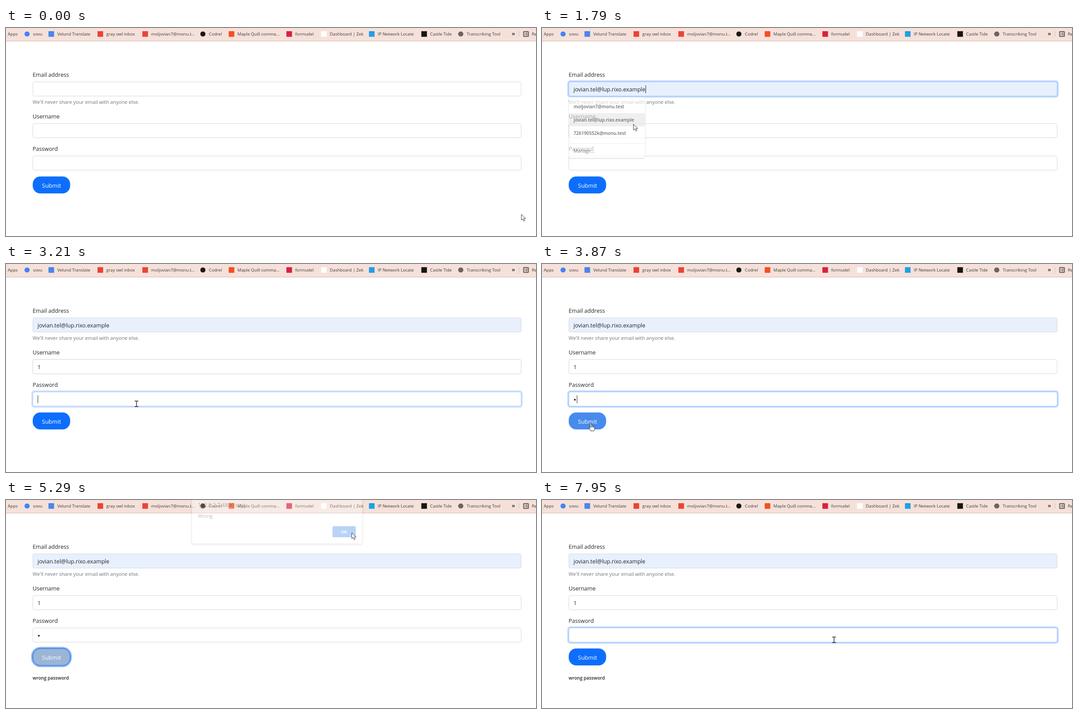
These frames come from a looping animation (1194x469 px, 8000 ms). An HTML page:

```html
<!DOCTYPE html>
<html lang="en">
<head>
<meta charset="utf-8">
<title>Sign-in form</title>
<style>
  html, body { margin: 0; width: 100%; height: 100%; overflow: hidden; background: #fff; }
  svg { display: block; width: 100vw; height: 100vh; }
  text { font-family: "Open Sans", sans-serif; font-size: 12.6px; fill: #212529; white-space: pre; }
  .mark { font-size: 9.6px; fill: #3b3a3a; }
  .hint { font-size: 11.2px; fill: #6c757d; }
  .row { font-size: 10.2px; font-weight: 600; fill: #202124; }
  .manage { font-size: 10.4px; fill: #3c4043; }
  .panel { fill: #fff; filter: drop-shadow(0 1px 1.5px rgba(0, 0, 0, .3)); }
  .dialog { fill: #fff; filter: drop-shadow(0 1px 2.5px rgba(0, 0, 0, .5)); }
</style>
</head>
<body>
<svg viewBox="0 0 1194 469" preserveAspectRatio="none">
  <g id="bar">
    <rect width="1194" height="29" fill="#f5e1da"/>
    <rect y="29" width="1194" height="1" fill="#d3b5ac"/>
    <text class="mark" x="4" y="17.3">Apps</text>
    <text class="mark" x="1139.5" y="17" style="font-size:12px;font-weight:700">»</text>
    <rect x="1155" y="7" width="1" height="13" fill="#d9bcb2"/>
    <g fill="none" stroke="#333" stroke-width="1.4">
      <rect x="1166" y="8" width="11" height="11" rx="1"/>
      <path d="M1168 11h1.4m1 0h5M1168 13.5h1.4m1 0h5M1168 16h1.4m1 0h5" stroke-width="1.1"/>
    </g>
    <text class="mark" x="1184.5" y="17.3">Reading list</text>
  </g>
  <text x="60" y="109.7">Email address</text>
  <text class="hint" x="60" y="170.6">We'll never share your email with anyone else.</text>
  <text x="60" y="203.7">Username</text>
  <text x="60" y="276.7">Password</text>
  <g id="fields"></g>
  <circle id="dot" cx="74" cy="306" r="2" fill="#212529"/>
  <rect id="caret" width="1" height="18" fill="#222"/>
  <rect id="button" x="60.2" y="334.8" width="84.3" height="38.2" rx="17"/>
  <g id="halo" fill="none">
    <rect x="58.4" y="333" width="88" height="42" rx="19" stroke="#0d6efd" stroke-opacity=".5" stroke-width="3.4"/>
    <rect x="60.4" y="334.9" width="84.2" height="38.2" rx="17" stroke="#0a58ca"/>
  </g>
  <text x="81" y="359.6" style="font-size:13px;fill:#fff">Submit</text>
  <text id="note" x="60" y="404.6" style="font-size:10.3px;font-weight:600">wrong password</text>
  <g id="popups"></g>
  <g id="alert">
    <rect class="dialog" x="420.5" y="-12" width="380.5" height="121.5" rx="4"/>
    <text x="434" y="27" style="font-size:11.8px;fill:#202124">192.0.2.7:4800 says</text>
    <text x="434" y="51" style="font-size:10.6px;fill:#202124">Wrong</text>
    <rect id="okRing" x="733" y="68.5" width="55" height="28" rx="4" fill="#fff" stroke="#1a73e8" stroke-width="1.6"/>
    <rect x="734.6" y="70" width="52" height="25" rx="2.5" fill="#1a73e8"/>
    <text x="760.3" y="86" text-anchor="middle" style="font-size:9.6px;font-weight:700;fill:#fff">OK</text>
  </g>
  <g id="cursor" stroke-linejoin="round" stroke-linecap="round">
    <path id="arrow" d="M0 .3V13.2L3.1 10.4 5.4 15.5 7.6 14.5 5.4 9.6H9.4Z" fill="#fff" stroke="#2b2b38" stroke-width=".95"/>
    <path id="beam" d="M-3.6-6H-1Q0-6 0-5Q0-6 1-6H3.6M0-5V5.5M-3.6 6.5H-1Q0 6.5 0 5.5Q0 6.5 1 6.5H3.6" fill="none" stroke="#222" stroke-width="1.4"/>
    <path id="hand" d="M-1.4.8Q0-1.3 1.4.8V6Q3-.2 4.2 6.2 5.4 4.9 6.4 6.7 8.6 6 8.6 8.4V11.8Q8.4 13.8 7.3 14.8V16.3H-.2V15Q-2.6 12.3-4.5 8.9-4.3 7-2.6 8.1L-1.4 9.5ZM1.4 6V8.6M4.2 6.2V8.6M6.4 6.7V8.8" fill="#fff" stroke="#2b2b33"/>
  </g>
</svg>
<script>
const $ = id => document.getElementById(id);

function add(parent, tag, attrs, text) {
  const node = document.createElementNS('http://www.w3.org/2000/svg', tag);
  set(node, attrs);
  if (text) node.textContent = text;
  parent.append(node);
  return node;
}
function set(node, attrs) { for (const k in attrs) node.setAttribute(k, attrs[k]); }
const fade = (node, opacity) => set(node, { opacity: +opacity });

// Linear 0..1 between two times, and the same eased
const ramp = (t, a, b) => Math.min(1, Math.max(0, (t - a) / (b - a)));
const ease = p => p * p * (3 - 2 * p);
const mix = (a, b, p) => a.map((v, i) => v + (b[i] - v) * p);

function bookmark(x, fill, label, round) {
  const r = round ? 5.8 : 6.3;
  add($('bar'), 'rect', { x: x - r, y: 13.5 - r, width: 2 * r, height: 2 * r, rx: round ? r : 0, fill });
  add($('bar'), 'text', { class: 'mark', x: x + 13.6, y: 17.3 }, label);
}
bookmark(47.5, '#4285f4', 'sovu', true);
bookmark(102, '#4a86e8', 'Velund Translate');
bookmark(212.5, '#ea4335', 'gray owl inbox');
bookmark(313.5, '#ea4335', 'moljovian7@monu.t...');
bookmark(443.5, '#1b1817', 'Codrel', true);
bookmark(508, '#f25022', 'Maple Quill comma...');
bookmark(638, '#d8213d', 'formudel');
bookmark(716, '#fff', 'Dashboard | Zek');
bookmark(824, '#1fa0e6', 'IP Network Locate');
bookmark(942, '#151515', 'Castle Tide');
bookmark(1024.5, '#6b6463', 'Transcribing Tool', true);

function field(y) {
  const g = $('fields');
  const outline = (parent, grow, attrs) => add(parent, 'rect', {
    x: 60.5 - grow, y: y + .5 - grow, width: 1100 + 2 * grow, height: 32 + 2 * grow, rx: 3.4 + grow, ...attrs
  });
  const box = outline(g, 0, { stroke: '#ced4da', 'stroke-width': .9 });
  const ring = add(g, 'g', { fill: 'none' });
  outline(ring, 0, { stroke: '#94bffe' });
  outline(ring, 2, { stroke: '#0d6efd', 'stroke-opacity': .25, 'stroke-width': 3 });
  return { y, box, ring, text: add(g, 'text', { x: 71, y: y + 21.6 }) };
}
const fields = [121, 215, 288].map(field);

function popup(top, rows) {
  const g = add($('popups'), 'g', {}), first = top + 6, end = first + 30 * rows.length;
  add(g, 'rect', { class: 'panel', x: 61, y: top, width: 171, height: end - top + 41, rx: 3 });
  const hover = add(g, 'rect', { x: 61, width: 171, height: 30, fill: '#e8e8e8' });
  rows.forEach((s, i) => add(g, 'text', { class: 'row', x: 71.3, y: first + 18.7 + 30 * i }, s));
  add(g, 'rect', { x: 61, y: end + 8, width: 171, height: 1, fill: '#e4e4e4' });
  add(g, 'text', { class: 'manage', x: 71.3, y: end + 28.8 }, 'Manage...');
  // Returns the text of the row under the pointer
  return (alpha, x, y) => {
    const i = Math.floor((y - first) / 30);
    const row = alpha > 0 && x > 61 && x < 232 && rows[i] || '';
    fade(g, alpha);
    fade(hover, row !== '');
    if (row) set(hover, { y: first + 30 * i });
    return row;
  };
}
const login = 'jovian.tel@lup.rixo.example';
const emailPopup = popup(156, ['moljovian7@monu.test', login, '726190552k@monu.test']);
const userPopup = popup(250, ['1', 'jovian', 'moljovian7', 'jovian.tel', '726190552k']);

// Times of what the user does
const T = {
  email: 680, pick: 1650, user: 2290, typeUser: 2590, pass: 3060, typePass: 3420,
  hover: 3640, submit: 3880, alert: 3980, ok: 5180, retry: 7130, erase: 7430
};

// Pointer moves: start, end, target x and y
const moves = [
  [70, 820, 238, 142], [890, 1400, 205, 231], [1440, 1510, 206, 217],
  [1930, 2250, 250, 236], [2740, 3050, 294, 315], [3360, 3740, 110, 360],
  [3980, 4133, 140, 399], [4400, 4533, 685, 196], [4533, T.ok, 779, 74],
  [5780, 6190, 767, 125], [6350, 6610, 684, 238], [6690, 6820, 647, 340], [7010, 7400, 658, 315]
];
const pointer = t => moves.reduce(
  (p, [a, b, x, y]) => mix(p, [x, y], ease(ramp(t, a, b))), [1161, 420]);

function pointerKind(t, x, y, overPopup) {
  if (t >= T.alert && t < T.ok) return y < 110 ? 'arrow' : 'hand';
  if (overPopup) return 'arrow';
  if (x > 60 && x < 1161 && fields.some(f => y >= f.y && y <= f.y + 32)) return 'beam';
  return x > 60 && x < 145 && y > 335 && y < 373 ? 'hand' : 'arrow';
}

function drawCaret(t, hasDot) {
  const f = fields[t < T.user ? 0 : t < T.pass ? 1 : 2];
  const active = t >= T.email && t < T.submit || t >= T.erase;
  const last = Math.max(...Object.values(T).filter(v => v <= t));
  const width = hasDot ? 7 : f.text.getComputedTextLength();
  set($('caret'), { x: 71.4 + width, y: f.y + 8 });
  fade($('caret'), active && (t - last) % 1000 < 500);
}

const BLUE = [13, 110, 253], GREY = [154, 181, 214], NAVY = [11, 94, 215];

function drawButton(t) {
  // The page freezes under the alert, so the hover fade stops part way
  const grey = .62 * ramp(t, T.hover, T.alert) + .38 * ramp(t, T.ok, T.ok + 80);
  const navy = ramp(t, T.ok + 120, T.ok + 430);
  const rest = ramp(t, T.retry, T.retry + 270);
  const fill = mix(mix(mix(BLUE, GREY, grey), NAVY, navy), BLUE, rest);
  set($('button'), { fill: `rgb(${fill.map(Math.round)})` });
  fade($('halo'), ramp(t, T.ok, T.ok + 80) - ramp(t, T.retry, T.retry + 150));
  fade($('note'), t >= T.ok);
}

function drawAlert(t) {
  const alpha = ramp(t, T.alert, T.alert + 150) - ramp(t, T.ok, T.ok + 125);
  const s = 1 + .011 * (1 - alpha);
  set($('alert'), { transform: `translate(${611 * (1 - s)} ${-16 * (1 - alpha)}) scale(${s} 1)` });
  fade($('alert'), alpha);
  fade($('okRing'), t <= T.ok);
}

function drawRings(t) {
  const on = (start, d = 150) => ramp(t, start, start + d);
  fade(fields[0].ring, on(T.email) - on(T.user));
  fade(fields[1].ring, on(T.user) - on(T.pass));
  fade(fields[2].ring, on(T.pass, 180) - .35 * on(T.submit, 110) - .65 * on(T.ok, 80) + on(T.retry));
}

function render(t) {
  const [x, y] = pointer(t);
  const row = emailPopup(ramp(t, 730, 810) - ramp(t, T.pick + 70, T.pick + 300), x, y);
  userPopup(ramp(t, 2370, 2450) - ramp(t, T.typeUser, T.typeUser + 150), x, y);

  const kind = pointerKind(t, x, y, row);
  set($('cursor'), { transform: `translate(${Math.round(x)} ${Math.round(y)})` });
  for (const id of ['arrow', 'beam', 'hand']) fade($(id), id === kind);

  const email = t >= T.pick ? login : row;
  const hasDot = t >= T.typePass && t < T.erase;
  fields[0].text.textContent = email;
  fields[1].text.textContent = t >= T.typeUser ? '1' : '';
  fields.forEach(f => set(f.box, { fill: f === fields[0] && email ? '#e8f0fe' : '#fff' }));
  fade($('dot'), hasDot);

  drawCaret(t, hasDot);
  drawRings(t);
  drawButton(t);
  drawAlert(t);
}

// The screen advances in even ticks
const LOOP = 8000, TICK = LOOP / 120;
function frame() {
  const t = performance.now() % LOOP;
  render(Math.min(119, Math.floor((t + 10.1) / TICK)) * TICK);
  requestAnimationFrame(frame);
}
frame();
</script>
</body>
</html>
```
